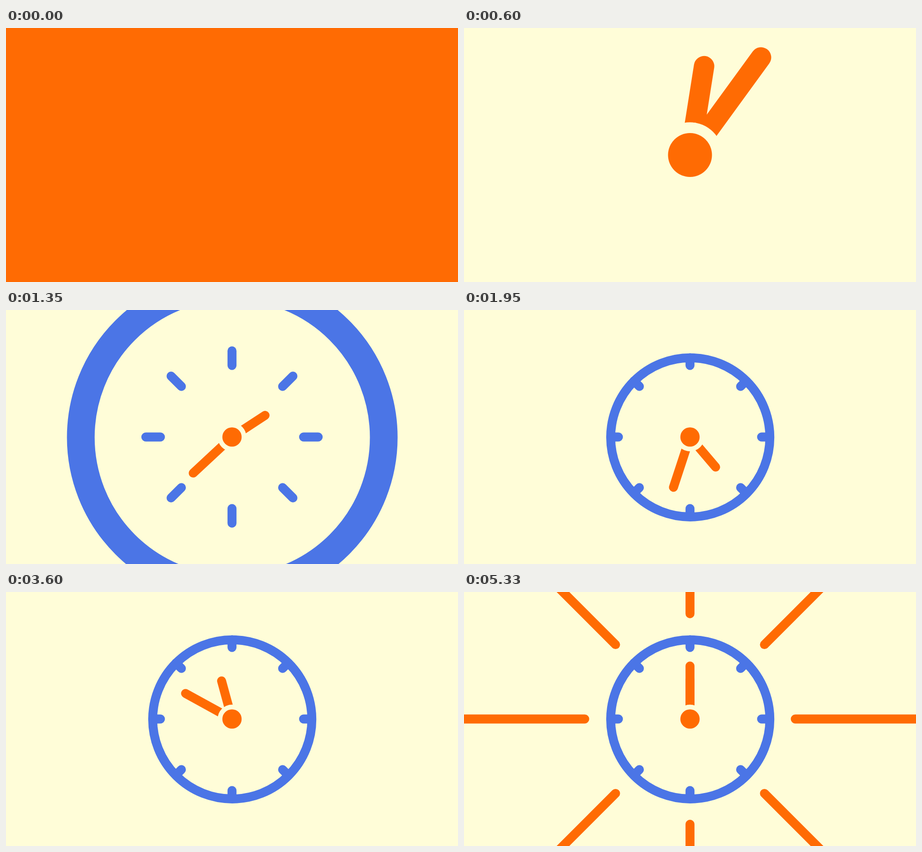
An HTML page for the animation above (5.42 s loop, 998 px wide and 561 px high).

```html
<!DOCTYPE html>
<html lang="en">
<head>
<meta charset="utf-8">
<title>Clock</title>
<style>
  html, body { margin: 0; width: 100%; height: 100%; overflow: hidden; background: #fffdd8; }
  svg { display: block; width: 100vw; height: 100vh; }
  line { stroke-width: 19.8; stroke-linecap: round; }
</style>
</head>
<body>
<svg viewBox="0 0 998 561" preserveAspectRatio="none">
  <g transform="translate(499 280.5)">
    <g id="rays" stroke="#ff6b03"></g>
    <g id="ticks" stroke="#4b75e6"></g>
    <circle id="ring" cx=".6" cy=".8" fill="none" stroke="#4b75e6"/>
    <g id="hands" stroke="#ff6b03">
      <line id="hourHand" y2="-87.2"/>
      <line id="minuteHand" y2="-117"/>
      <circle r="31.7" fill="#fffdd8" stroke="none"/>
      <circle r="21.3" fill="#ff6b03" stroke="none"/>
    </g>
  </g>
</svg>
<script>
const LOOP = 5420;
const byId = id => document.getElementById(id);
const [ring, hands, hourHand, minuteHand] =
  ['ring', 'hands', 'hourHand', 'minuteHand'].map(byId);

function addSpokes(group) {
  return Array.from({ length: 8 }, (_, i) => {
    const line = document.createElementNS('http://www.w3.org/2000/svg', 'line');
    line.setAttribute('transform', `rotate(${i * 45})`);
    return group.appendChild(line);
  });
}

const rays = addSpokes(byId('rays'));
const ticks = addSpokes(byId('ticks'));

function setSpokes(spokes, inner, outer) {
  for (const line of spokes) {
    line.setAttribute('y1', -inner);
    line.setAttribute('y2', -outer);
  }
}

// Falls to 0 at `end`, passing through 1 at `unit`.
const decay = (t, unit, end, power) =>
  Math.pow(Math.max(0, end - t) / (end - unit), power);

// Cubic bezier easing with horizontal tangents at both ends.
function easeInOut(x, x1, x2) {
  if (x >= 1) return 1;
  let low = 0, high = 1, s;
  for (let i = 0; i < 30; i++) {
    s = (low + high) / 2;
    const bx = 3 * s * (1 - s) ** 2 * x1 + 3 * s * s * (1 - s) * x2 + s ** 3;
    if (bx < x) low = s; else high = s;
  }
  return s * s * (3 - 2 * s);
}

function draw(t) {
  const turn = 1440 * easeInOut(t / 4372, 0.541, 0.455);
  hands.setAttribute('transform', `scale(${1 + 27 * decay(t, 0, 1500, 5.96)})`);
  minuteHand.setAttribute('transform', `rotate(${turn})`);
  hourHand.setAttribute('transform', `rotate(${turn / 4})`);

  const spread = decay(t, 1350, 1670, 2.5);
  ring.setAttribute('r', 175.7 + 160 * spread);
  ring.setAttribute('stroke-width', 19.8 + 41.7 * spread);

  const tickInner = 158 + 420 * decay(t, 600, 1450, 5);
  const tickOuter = 175 + 15.5 * decay(t, 1350, 1670, 4);
  setSpokes(ticks, tickInner, Math.max(tickInner, tickOuter));

  const rayInner = 231.7 + 223.3 * decay(t, 3850, 6500, 7);
  setSpokes(rays, rayInner, Math.max(rayInner, 700));
}

const start = performance.now();
function tick() {
  draw((performance.now() - start) % LOOP);
  requestAnimationFrame(tick);
}
tick();
</script>
</body>
</html>
```
